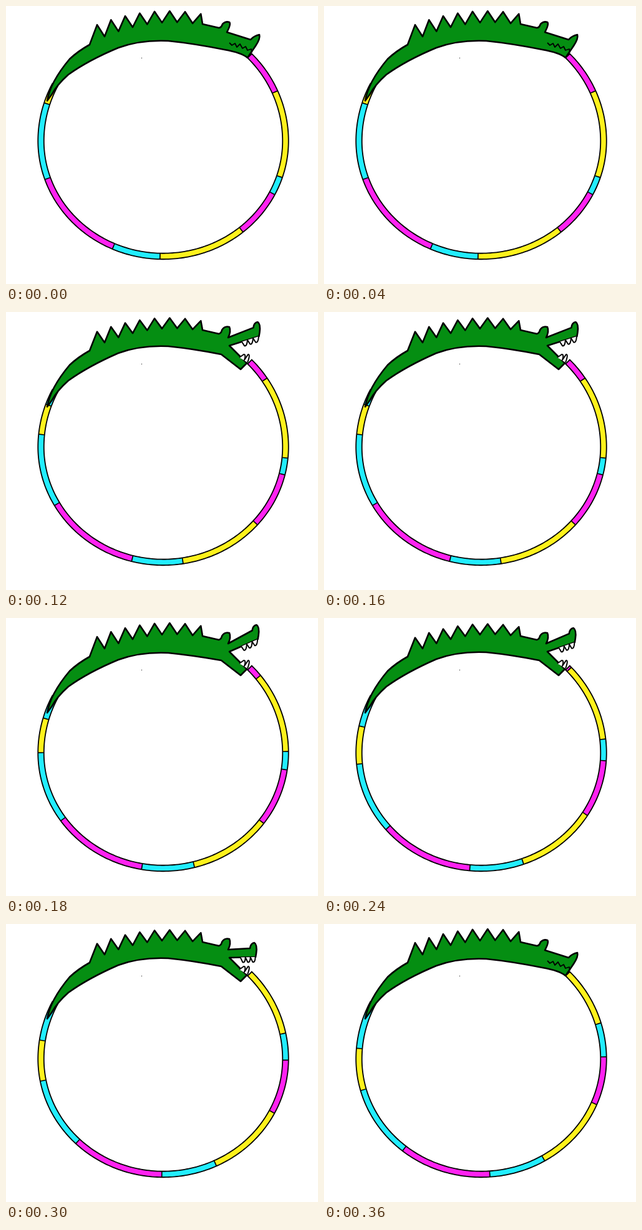
Write an HTML page with a canvas that moves like this. It is 500x446 px and loops after 420 ms.

```html
<!DOCTYPE html>
<html lang="en">
<head>
<meta charset="utf-8">
<title>Crocodile ring</title>
<style>
html, body { margin: 0; width: 100%; height: 100%; overflow: hidden; background: #fff; }
canvas { display: block; }
</style>
</head>
<body>
<canvas id="stage" width="500" height="446"></canvas>
<script>
const ctx = document.getElementById('stage').getContext('2d');
const STEP = 60, POSES = 7, HEAD = -45, TAIL = 208;
const YELLOW = '#fff21c', CYAN = '#22edff', MAGENTA = '#ff22f0', GREEN = '#058e12';

// Each band runs from the previous one to an edge that slides towards the mouth.
const BANDS = [
  { color: MAGENTA, from: -24, to: -54 },
  { color: YELLOW, from: 18, to: -17, ease: 1.1 },
  { color: CYAN, from: 27, to: -1, ease: 1.6 },
  { color: MAGENTA, from: 50.4, to: 22.7 },
  { color: YELLOW, from: 91.5, to: 59.5 },
  { color: CYAN, from: 114, to: 86 },
  { color: MAGENTA, from: 161, to: 129 },
  { color: CYAN, from: 198, to: 164.5, ease: 1.1 },
  { color: YELLOW, from: 208, to: 185 },
  { color: CYAN, from: TAIL, to: TAIL }
];

function ringPoint(deg) {
  const a = deg * Math.PI / 180, s = Math.sin(a);
  return [252 + 196 * Math.cos(a), 216.5 + (s > 0 ? 185 : 193) * s];
}

function arc(from, to, width, color) {
  ctx.beginPath();
  for (let a = from; a < to; a++) ctx.lineTo(...ringPoint(a));
  ctx.lineTo(...ringPoint(to));
  ctx.lineWidth = width;
  ctx.strokeStyle = color;
  ctx.stroke();
}

function ink(d, fill, width) {
  const path = new Path2D(d);
  if (fill) {
    ctx.fillStyle = fill;
    ctx.fill(path);
  }
  ctx.lineWidth = width;
  ctx.strokeStyle = '#000';
  ctx.stroke(path);
}

function drawRing(t) {
  const gap = 0.25;
  let start = HEAD;
  arc(HEAD - 0.3, TAIL, 11.3, '#000');
  for (const { color, from, to, ease = 1 } of BANDS) {
    const end = Math.max(HEAD, to + (from - to) * (1 - t) ** ease);
    if (end - start > 2 * gap) arc(start + gap, end - gap, 7.7, color);
    start = end;
  }
}

// Peaks and valleys lie on two flat parabolas.
function spikes(drop) {
  let d = '';
  for (let i = 0; i < 8; i++) {
    const x = 146 + 22 * i + i * i / 4, v = x + 12;
    d += `L${x} ${8 + drop + 0.0017 * (x - 260) ** 2}`;
    if (i < 7) d += `L${v} ${26 + 0.0019 * (v - 268) ** 2}`;
  }
  return d + 'L315 29L341 35';
}

const CLOSED_HEAD = `Q345 35 347 29Q352 24 358 26Q361 29 354 42
  L392 54Q397 48 406 46Q408 52 400 64L387 83Q378 75 350 70`;

function openHead(x, y) {
  return `Q345 34 346 29Q350 22 358 24Q361 31 356 41
    L${x - 9} ${y - 14}Q${x - 8} ${y - 22} ${x - 2} ${y - 23}Q${x + 3} ${y - 20} ${x + 1} ${y - 6}
    L${x} ${y}L358 54L386 82L376 92L345 68`;
}

function upperTeeth(x, y) {
  const edge = f => [358 + (x - 358) * f, 54 + (y - 54) * f];
  let d = 'M' + edge(0.42);
  for (let f = 0.42; f < 0.9; f += 0.19) {
    const [tx, ty] = edge(f + 0.09);
    d += `L${tx} ${ty + 8}Q${tx + 4} ${ty + 9} ${edge(f + 0.19)}`;
  }
  return d;
}

function drawCroc(pose) {
  const open = Math.sin(Math.PI * pose / (POSES - 1)), isOpen = open > 0.01;
  const bob = pose % 3 ? 1 : 0;
  const x = 409 - 1.8 * pose, y = 72 - 38 * open;
  ink(`M66 152C70 128 86 104 102 85Q116 72 134 62${spikes(1.5 * bob)}
    ${isOpen ? openHead(x, y) : CLOSED_HEAD}
    Q300 ${60 - bob} 260 ${56 - bob}Q215 ${54 - bob} 180 ${67 - bob}
    Q132 87 100 110Q82 126 74 141Z`, GREEN, 2.6);
  if (isOpen) {
    ink(upperTeeth(x, y), '#fff', 2);
    ink('M374 73L381 68Q385 68 382 77L388 68Q392 68 387 81', '#fff', 2);
  } else {
    ink('M358 59L362 63L367 60L370 66L375 61L379 68L384 65L387 71L393 69L394 75', null, 1.8);
  }
}

function draw(ms) {
  const pose = Math.floor(ms / STEP) % POSES;
  ctx.fillStyle = '#fff';
  ctx.fillRect(0, 0, 500, 446);
  ctx.lineJoin = 'round';
  drawRing(pose / (POSES - 1));
  drawCroc(pose);
  ctx.fillStyle = '#000';
  ctx.fillRect(217, 83, 1, 1);
}

let start;
function tick(now) {
  start ??= now;
  draw(now - start);
  requestAnimationFrame(tick);
}
draw(0);
requestAnimationFrame(tick);
</script>
</body>
</html>
```
